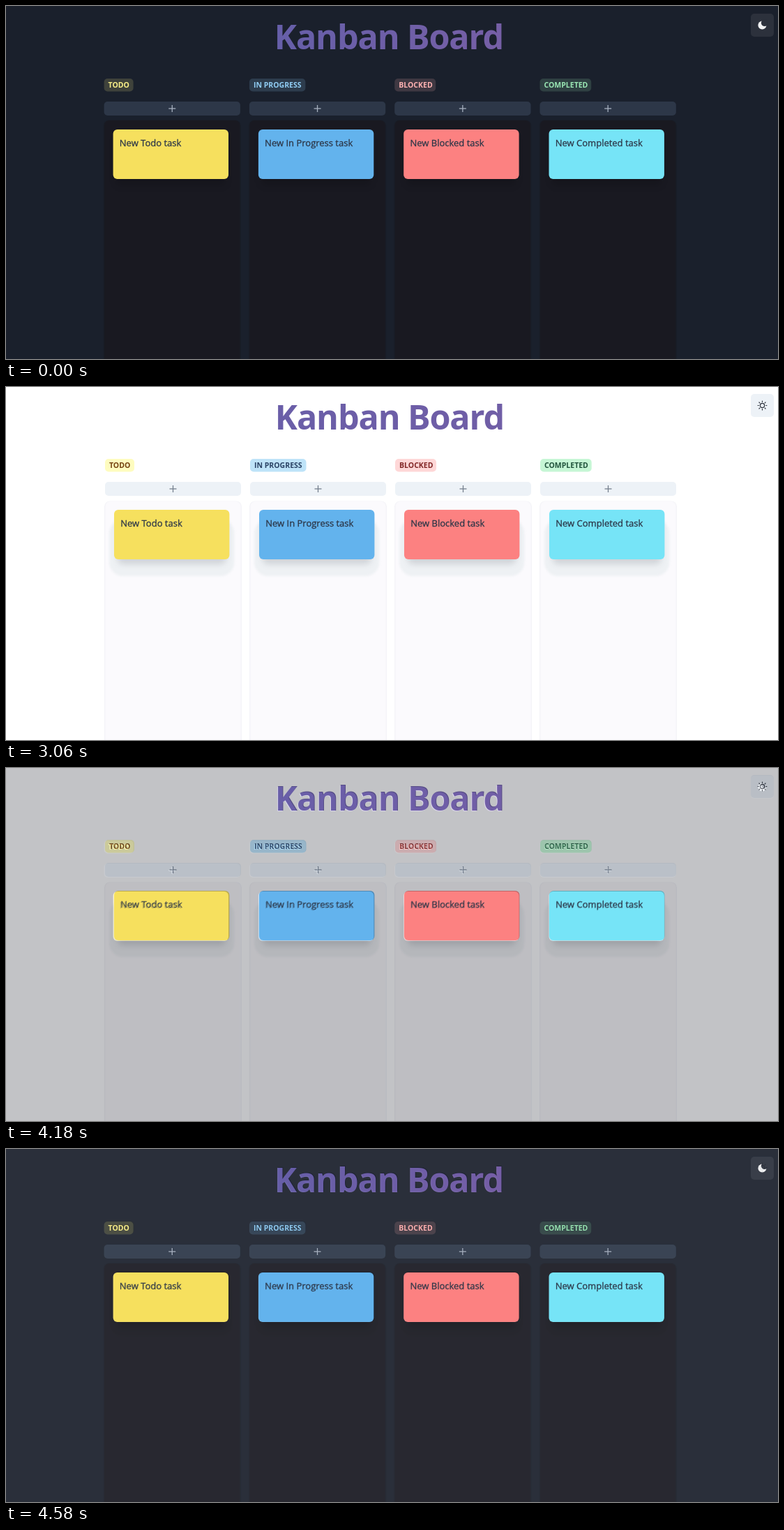
An HTML page with a canvas for the animation above (4620 ms loop, 1107 by 506 pixels).

```html
<!DOCTYPE html>
<html lang="en">
<head>
<meta charset="utf-8">
<title>Kanban Board</title>
<style>
  html, body { margin: 0; width: 100%; height: 100%; overflow: hidden; background: #1a202c; }
  canvas { display: block; width: 1107px; height: 506px; }
</style>
</head>
<body>
<canvas id="stage" width="1107" height="506"></canvas>
<script>
const W = 1107, H = 506, LOOP = 4620, STEP = 40, STEPS = 15;
const TO_LIGHT = 2500, TO_DARK = 4060;
const FONT = '"Open Sans", "Noto Sans", sans-serif';

const columns = [
  { name: 'Todo', badge: 42, card: '#f6e05e' },
  { name: 'In Progress', badge: 80.5, card: '#63b3ed' },
  { name: 'Blocked', badge: 59, card: '#fc8181' },
  { name: 'Completed', badge: 73.7, card: '#76e4f7' }
];

const dark = {
  bg: '#1a202c', column: '#191921', edge: '#191d27',
  button: '#2d3748', plus: '#a6b0bf', toggle: '#2c313c',
  title: ['#665fa9', '#765fa6'], titleX: 384.8,
  x: 140.6, y: 0, pitch: 208.3, width: 195.3,
  badges: ['rgba(250,240,137,.16)', 'rgba(144,205,244,.16)', 'rgba(254,178,178,.16)', 'rgba(154,230,180,.16)'],
  labels: ['#faf089', '#90cdf4', '#feb2b2', '#9ae6b4'],
  icon: moon, shadow: darkShadow
};

const light = {
  bg: '#ffffff', column: '#fbfafd', edge: '#f4f4f8',
  button: '#edf2f7', plus: '#77818f', toggle: '#edf2f7',
  title: ['#6a5ea8', '#705ea6'], titleX: 385.8,
  x: 142, y: -1, pitch: 208, width: 195,
  badges: ['#fefcbf', '#bee3f8', '#fed7d7', '#c6f6d5'],
  labels: ['#744210', '#2a4365', '#822727', '#22543d'],
  icon: sun, shadow: lightShadow
};

function box(g, x, y, w, h, r, fill) {
  g.beginPath();
  g.roundRect(x, y, w, h, r);
  g.fillStyle = fill;
  g.fill();
}

function disc(g, x, y, r, fill) {
  g.beginPath();
  g.arc(x, y, r, 0, Math.PI * 2);
  g.fillStyle = fill;
  g.fill();
}

function text(g, str, x, y, font, fill, { tracking = 0, weight = 0 } = {}) {
  g.font = font + ' ' + FONT;
  g.letterSpacing = tracking + 'px';
  g.fillStyle = g.strokeStyle = fill;
  g.fillText(str, x, y);
  if (weight) {
    g.lineWidth = weight;
    g.strokeText(str, x, y);
  }
}

function blurBox(g, x, y, w, h, r, blur, color) {
  g.save();
  g.filter = `blur(${blur}px)`;
  box(g, x, y, w, h, r, color);
  g.restore();
}

function darkShadow(g, x, y, w, h) {
  blurBox(g, x + 4, y + 9, w - 8, h, 6, 5, 'rgba(0,0,0,.14)');
}

function lightShadow(g, x, y, w, h) {
  blurBox(g, x - 7, y + 14, w + 14, h + 10, 20, 1.5, '#eef1f4');
  blurBox(g, x + 5, y + 12, w - 10, h - 5, 8, 4, 'rgba(40,48,64,.15)');
}

function moon(g, theme) {
  disc(g, 1084.4, 27.6, 6, '#f0f1f2');
  disc(g, 1087.8, 24.2, 4.9, theme.toggle);
}

function sun(g) {
  const cx = 1084.5, cy = 26.5;
  g.strokeStyle = '#2b303b';
  g.lineWidth = 1.2;
  g.lineCap = 'round';
  g.beginPath();
  g.arc(cx, cy, 3.1, 0, Math.PI * 2);
  for (let i = 0; i < 8; i++) {
    const c = Math.cos(i * Math.PI / 4), s = Math.sin(i * Math.PI / 4);
    g.moveTo(cx + c * 5.2, cy + s * 5.2);
    g.lineTo(cx + c * 6.4, cy + s * 6.4);
  }
  g.stroke();
}

function drawColumn(g, theme, col, i) {
  const { y, width } = theme, x = theme.x + i * theme.pitch;

  box(g, x, 104 + y, col.badge, 18.5, 5, theme.badges[i]);
  text(g, col.name.toUpperCase(), x + 6, 117.4 + y, 'bold 10.5px', theme.labels[i]);

  box(g, x, 137 + y, width, 20, 5, theme.button);
  const cx = x + width / 2, cy = 147 + y;
  g.fillStyle = theme.plus;
  g.fillRect(cx - 5, cy - .65, 10, 1.3);
  g.fillRect(cx - .65, cy - 5, 1.3, 10);

  box(g, x - 1, 163.5, width + 2, 400, 8, theme.edge);
  box(g, x + .5, 164, width - 1, 400, 7, theme.column);

  const left = x + 13, top = 177 + y;
  theme.shadow(g, left, top, 165.4, 71);
  box(g, left, top, 165.4, 71, 6, col.card);
  text(g, `New ${col.name} task`, left + 9.2, top + 24, '500 13px', '#2d3748', { weight: .3 });
}

function render(theme) {
  const c = document.createElement('canvas');
  c.width = W;
  c.height = H;
  const g = c.getContext('2d');
  g.fillStyle = theme.bg;
  g.fillRect(0, 0, W, H);

  const fill = g.createLinearGradient(388, 0, 714, 0);
  theme.title.forEach((color, i) => fill.addColorStop(i, color));
  text(g, 'Kanban Board', theme.titleX, 62 + theme.y, 'bold 48.5px', fill, { tracking: -1.1 });

  box(g, 1068, 11 + theme.y, 33, 33, 5, theme.toggle);
  theme.icon(g, theme);
  columns.forEach((col, i) => drawColumn(g, theme, col, i));
  return c;
}

// Progress of a stepped fade that begins at the given time.
function fade(t, start) {
  const n = Math.floor((t - start) / STEP) + 1;
  return Math.max(0, Math.min(STEPS, n)) / STEPS;
}

const stage = document.getElementById('stage').getContext('2d');
const night = render(dark), day = render(light);
const begin = performance.now();

function frame() {
  const t = (performance.now() - begin) % LOOP;
  stage.globalAlpha = 1;
  stage.drawImage(night, 0, 0);
  stage.globalAlpha = fade(t, TO_LIGHT) - fade(t, TO_DARK);
  stage.drawImage(day, 0, 0);
  requestAnimationFrame(frame);
}
frame();
</script>
</body>
</html>
```
